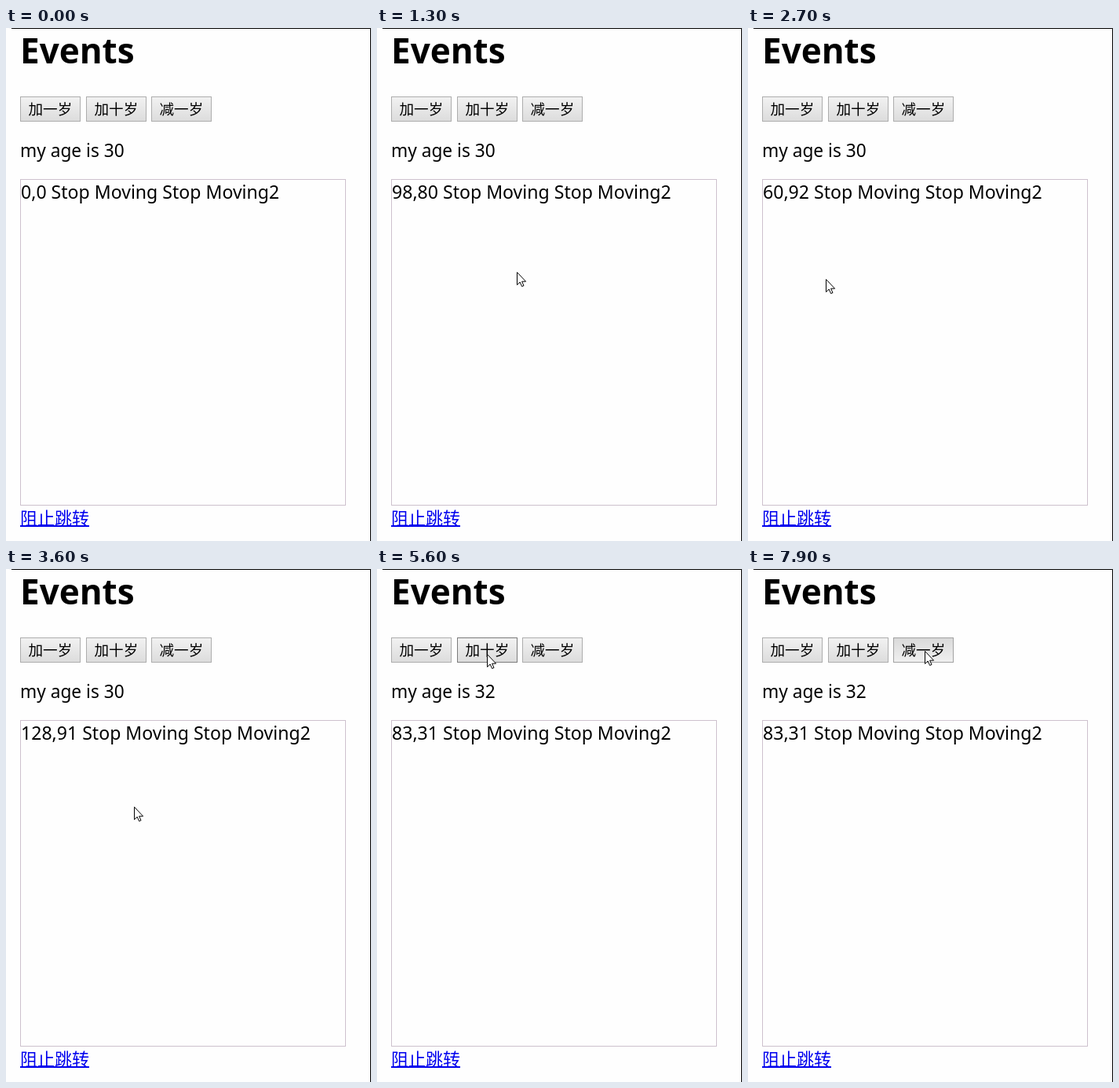
Animation, 465 px wide and 652 px high, one loop 8 s. Source, as an HTML page:

```html
<!DOCTYPE html>
<html lang="zh">
<head>
<meta charset="utf-8">
<style>
  html, body { margin: 0; width: 100%; height: 100%; overflow: hidden; background: #fefefe; }
  svg { display: block; font: 23.08px "Noto Sans", sans-serif; }
  .cjk { font-family: "Noto Sans CJK SC", "Noto Sans CJK", sans-serif; font-weight: 350; }
  .button rect { fill: url(#raised); stroke: #adadad; }
  .button text { font-size: 18.6px; }
  .hover rect { stroke: #7b7b7b; }
  .pressed rect { fill: url(#sunken); stroke: #a2a2a2; }
</style>
</head>
<body>
<svg width="465" height="652" viewBox="0 0 465 652">
  <defs>
    <linearGradient id="raised" x2="0" y2="1">
      <stop stop-color="#f2f2f2"/><stop offset="1" stop-color="#dcdcdc"/>
    </linearGradient>
    <linearGradient id="sunken" x2="0" y2="1">
      <stop stop-color="#d9d9d9"/><stop offset="1" stop-color="#f0f0f0"/>
    </linearGradient>
  </defs>
  <path d="M7 .5H464.5V652" fill="none" stroke="#000"/>
  <text x="18" y="45" font-size="44" font-weight="700">Events</text>
  <g id="buttons"></g>
  <text id="age" x="18" y="164" font-size="22.7"></text>
  <rect x="18.5" y="192.5" width="414" height="414" fill="none" stroke="#cdc1cd"/>
  <text id="position" x="19" y="217"></text>
  <text class="cjk" x="18" y="631" font-size="22" fill="#00e">阻止跳转</text>
  <path d="M18 633H106" stroke="#00e" stroke-width="2"/>
  <path id="cursor" d="M.5 .5V16.5L4.2 13 6.6 18.5 9 17.5 6.6 12.2H11.6Z" fill="#fff" stroke="#000"/>
</svg>
<script>
const STEP = 100, LOOP = 8000;   // ms; the picture advances in steps
const ENTER = 2, LEAVE = 37;     // steps at which the cursor appears and leaves the box
const BOX = [19, 193], ZOOM = 1.375, LAG = .6;
const $ = id => document.getElementById(id);

// Turning and resting points of the cursor: step, x, y.
const keys = [
  [2, 392, 187], [4, 276, 315], [7, 145, 303], [9, 85, 289], [12, 140, 300],
  [15, 262, 330], [18, 322, 331], [22, 204, 320], [27, 99, 319], [30, 150, 325],
  [33, 349, 355], [36, 163, 302], [42, 64, 113], [52, 64, 113],
  [56, 140, 108], [71, 140, 108], [74, 225, 104]
];

// Slope through key i; flat at turns, rests and both ends.
function slope(i, axis) {
  const a = keys[i - 1], b = keys[i], c = keys[i + 1];
  if (!a || !c || (b[axis] - a[axis]) * (c[axis] - b[axis]) <= 0) return 0;
  return (c[axis] - a[axis]) / (c[0] - a[0]);
}

function cursorAt(step) {
  const i = keys.findLastIndex(k => k[0] <= step);
  const a = keys[i], b = keys[i + 1];
  if (!b) return a.slice(1);
  const span = b[0] - a[0], u = (step - a[0]) / span, v = 1 - u;
  return [1, 2].map(axis =>
    v * v * (1 + 2 * u) * a[axis] + u * u * (1 + 2 * v) * b[axis] +
    u * v * span * (v * slope(i, axis) - u * slope(i + 1, axis)));
}

// The displayed coordinates trail slightly behind the cursor.
function readingAt(step) {
  if (step <= ENTER) return '0,0';
  if (step >= LEAVE) return '83,31';
  return cursorAt(step - LAG).map((p, i) => Math.round((p - BOX[i]) / ZOOM)).join();
}

const ages = [[0, 30], [46, 31], [50, 32], [58, 42], [75, 31], [78, 32]];

// Each button is pressed for one step, at a steady interval, between from and to.
const buttons = [
  { label: '加一岁', x: 18, from: 45, to: 50, every: 4 },
  { label: '加十岁', x: 102, from: 61, to: 70, every: 3 },
  { label: '减一岁', x: 185, from: 74, to: 80, every: 5 }
];
for (const b of buttons) {
  $('buttons').insertAdjacentHTML('beforeend',
    `<g class="button"><rect x="${b.x + .5}" y="87.5" width="76" height="31"/>
     <text class="cjk" x="${b.x + 10.5}" y="110">${b.label}</text></g>`);
  b.node = $('buttons').lastElementChild;
}

function draw(time) {
  const step = Math.floor(time % LOOP / STEP);
  const [x, y] = step < ENTER ? [-50, -50] : cursorAt(step).map(Math.round);
  $('cursor').setAttribute('transform', `translate(${x} ${y})`);
  $('position').textContent = readingAt(step) + ' Stop Moving Stop Moving2';
  $('age').textContent = 'my age is ' + ages.findLast(a => a[0] <= step)[1];
  for (const b of buttons) {
    const over = x >= b.x && x < b.x + 77 && y >= 87 && y < 119;
    const pressed = step >= b.from && step < b.to && (step - b.from) % b.every === 0;
    b.node.classList.toggle('hover', over);
    b.node.classList.toggle('pressed', pressed);
  }
}

const start = performance.now();
function tick() {
  draw(performance.now() - start);
  requestAnimationFrame(tick);
}
tick();
</script>
</body>
</html>
```
